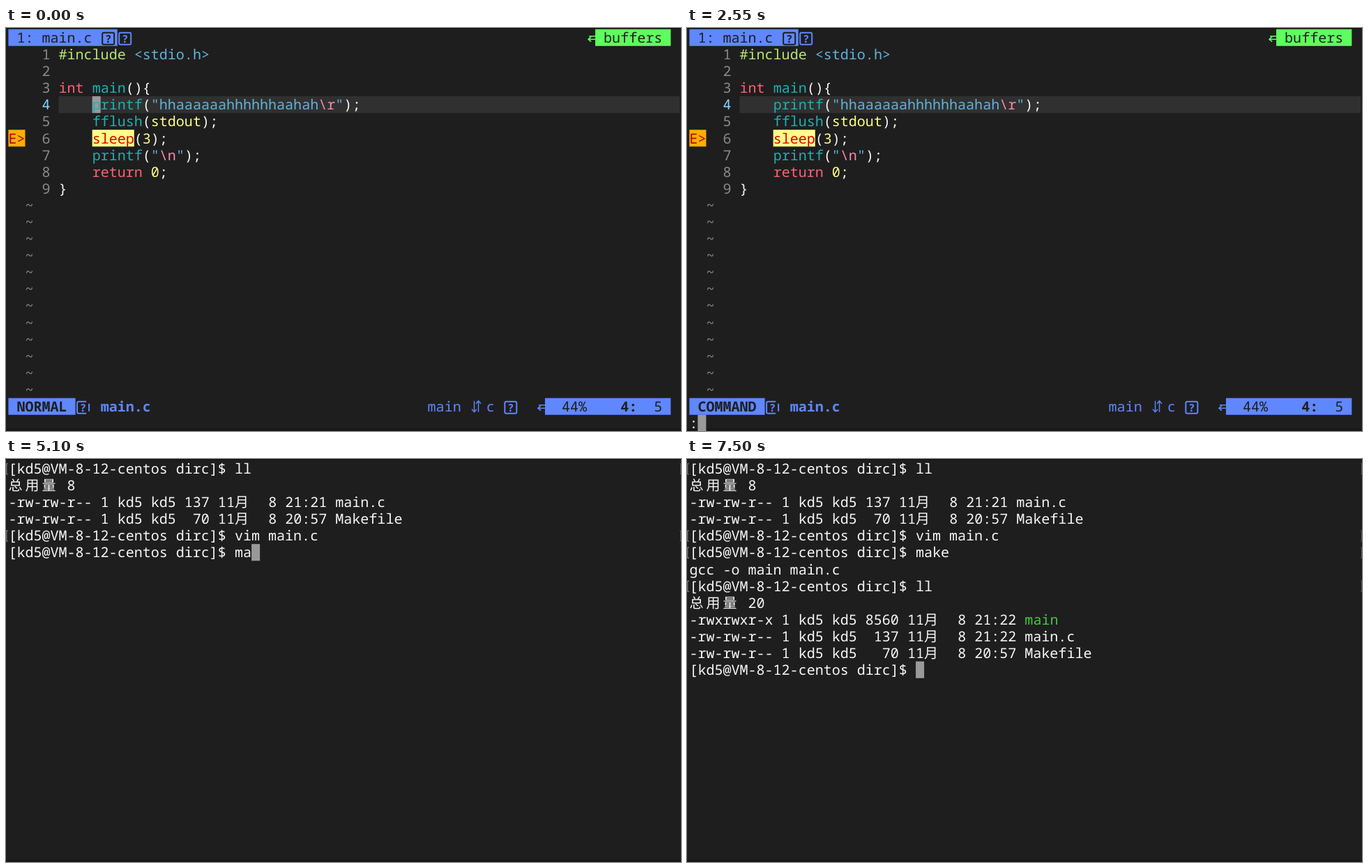
An HTML page that plays this animation: 968 by 579 pixels, repeating every 8000 ms.

```html
<!DOCTYPE html>
<html lang="en">
<head>
<meta charset="utf-8">
<title>Terminal session</title>
<style>
  html, body { margin: 0; width: 100%; height: 100%; overflow: hidden; background: #1e1e1e; }
  svg { display: block; width: 968px; height: 579px; }
  text {
    font: 20.04px "Noto Sans Mono", "DejaVu Sans Mono", monospace;
    white-space: pre;
    text-rendering: geometricPrecision;
    font-variant-ligatures: none;
  }
  .wide { font-family: "Noto Sans CJK SC", "Noto Sans CJK", sans-serif; }
  .bold { font-weight: 700; }
</style>
</head>
<body>
<svg id="stage" viewBox="0 0 968 579"></svg>
<script>
const LOOP = 8000, CELL_W = 12.024, CELL_H = 24.09, LEFT = 3.4, TOP = 1.7;
const BG = '#1e1e1e', BLUE = '#5f87ff', GREEN = '#5fff5f', WHITE = '#f7f7f7', GRAY = '#8a8a8a';
const LIME = '#b8e673', SKY = '#5fb3dc', TEAL = '#1fb0b0', RED = '#ff6078', PINK = '#ff87af', YELLOW = '#ffff87';
const stage = document.getElementById('stage');
const timed = [];
let layer = stage;

const colX = col => LEFT + col * CELL_W;
const rowY = row => TOP + row * CELL_H;

function add(tag, attrs, content = '') {
  const el = document.createElementNS('http://www.w3.org/2000/svg', tag);
  for (const [key, value] of Object.entries(attrs)) el.setAttribute(key, value);
  el.textContent = content;
  return layer.appendChild(el);
}

const block = (col, row, cells, fill) =>
  add('rect', { x: colX(col), y: rowY(row), width: cells * CELL_W, height: CELL_H, fill });

const line = (d, stroke, width = 1.6) =>
  add('path', { d, stroke, fill: 'none', 'stroke-width': width });

// Writes text on the grid; Chinese characters take two cells each.
function write(col, row, text, fill = WHITE, cls = '') {
  for (const run of text.match(/[\u4e00-\u9fff]|[^\u4e00-\u9fff]+/g)) {
    const wide = run >= '\u4e00';
    if (run.trim()) {
      add('text', { x: colX(col), y: rowY(row) + 19.3, fill, class: wide ? 'wide' : cls }, run);
    }
    col += wide ? 2 : run.length;
  }
  return col;
}

function spans(col, row, ...parts) {
  for (const [text, fill] of parts) col = write(col, row, text, fill);
}

// Adds a group that is visible only in the given [from, to) ranges.
function during(ranges, draw) {
  const parent = layer;
  layer = add('g', {});
  timed.push({ el: layer, ranges });
  draw();
  layer = parent;
}

function missingGlyph(col, row, color, cut = false) {
  const x = colX(col) + 2.5, y = rowY(row) + 5;
  if (cut) line(`M${x + 13} ${y}H${x + 2}Q${x} ${y} ${x} ${y + 2}V${y + 15}Q${x} ${y + 17} ${x + 2} ${y + 17}H${x + 13}M${x + 17} ${y + 3}V${y + 14}`, color, 2);
  else add('rect', { x, y, width: 17, height: 17, rx: 2, fill: 'none', stroke: color, 'stroke-width': 2 });
  add('text', { x: x + 8.5, y: y + 14, fill: color, class: 'bold', 'text-anchor': 'middle', style: 'font-size:15px' }, '?');
}

function arrow(col, row, color) {
  const x = colX(col), y = rowY(row) + 10;
  line(`M${x} ${y}H${x - 9}M${x} ${y + 4.5}H${x - 10}M${x - 6} ${y + 1}L${x - 10} ${y + 4.5}L${x - 6} ${y + 8}`, color);
}

function mode(name) {
  const end = name.length + 2;
  block(0, 22, end, BLUE);
  write(1, 22, name, BG, 'bold');
  missingGlyph(end, 22, BLUE, true);
  write(end + 3, 22, 'main.c', BLUE, 'bold');
}

function editor() {
  block(0, 0, 13, BLUE);
  write(1, 0, '1: main.c', BG);
  missingGlyph(11, 0, BG);
  missingGlyph(13, 0, BLUE);
  arrow(70, 0, GREEN);
  block(70, 0, 9, GREEN);
  write(71, 0, 'buffers', BG);

  for (let n = 1; n <= 9; n++) write(4, n, String(n), n === 4 ? '#87d7ff' : GRAY);
  for (let row = 10; row <= 21; row++) write(2, row, '~', GRAY);

  spans(6, 1, ['#include ', LIME], ['<stdio.h>', SKY]);
  spans(6, 3, ['int ', RED], ['main', TEAL], ['(){', WHITE]);
  spans(10, 4, ['printf', TEAL], ['(', WHITE], ['"hhaaaaaahhhhhhaahah', SKY], ['\\r', PINK], ['"', SKY], [');', WHITE]);
  spans(10, 5, ['fflush', TEAL], ['(', WHITE], ['stdout', YELLOW], [');', WHITE]);
  block(0, 6, 2, '#ffaf00');
  write(0, 6, 'E>', '#b00000');
  block(10, 6, 5, YELLOW);
  spans(10, 6, ['sleep', '#d70000'], ['(', WHITE], ['3', YELLOW], [');', WHITE]);
  spans(10, 7, ['printf', TEAL], ['(', WHITE], ['"', SKY], ['\\n', PINK], ['"', SKY], [');', WHITE]);
  spans(10, 8, ['return ', RED], ['0', YELLOW], [';', WHITE]);
  write(6, 9, '}');

  write(50, 22, 'main', BLUE);
  const y = rowY(22);
  line(`M671.5 ${y + 4}V${y + 20}M668 ${y + 16}L671.5 ${y + 20}L675 ${y + 16}M677.5 ${y + 20}V${y + 4}M674 ${y + 8}L677.5 ${y + 4}L681 ${y + 8}`, BLUE, 1.4);
  write(57, 22, 'c', BLUE);
  missingGlyph(59, 22, BLUE);
  arrow(64, 22, BLUE);
  block(64, 22, 15, BLUE);
  write(66, 22, '44%', BG);
  write(73, 22, '4:', BG, 'bold');
  write(77, 22, '5', BG);
}

const PROMPT = '[kd5@VM-8-12-centos dirc]$ ';
const prompt = (row, command = '') => write(0, row, PROMPT + command);

function mark(row) {
  const y = rowY(row);
  line(`M3 ${y + 5}H.8V${y + 20}H3`, '#858585', 1.1);
  line(`M966 ${y + 5}H967.5V${y + 20}H966`, '#555', 1);
}

// Top and bottom window edges
add('rect', { width: 968, height: 1.2, fill: '#101010' });
add('rect', { y: 575.5, width: 968, height: 3.5, fill: '#19161a' });

during([[0, 3600]], () => add('rect', {
  x: colX(6), y: rowY(4), width: 966 - colX(6), height: CELL_H, fill: '#303030'
}));

const cursor = block(0, 0, 1, '#999');

const commandTimes = [[750, 1650], [2100, 3600]];
during([[0, 3600]], editor);
during([[0, 750], [1650, 2100]], () => mode('NORMAL'));
during(commandTimes, () => mode('COMMAND'));
during(commandTimes, () => write(0, 23, ':'));
during([[1050, 1650], [3000, 3600]], () => write(1, 23, 'w'));
during([[3150, 3600]], () => write(2, 23, 'q'));
during([[1650, 2100]], () => write(0, 23, '"main.c" 9L, 137C written'));

during([[3600, LOOP]], () => {
  mark(0);
  prompt(0, 'll');
  write(0, 1, '总用量 8');
  write(0, 2, '-rw-rw-r-- 1 kd5 kd5 137 11月  8 21:21 main.c');
  write(0, 3, '-rw-rw-r-- 1 kd5 kd5  70 11月  8 20:57 Makefile');
  mark(4);
  prompt(4, 'vim main.c');
  prompt(5);
});
during([[5100, LOOP]], () => write(27, 5, 'ma'));
during([[5250, LOOP]], () => write(29, 5, 'k'));
during([[5400, LOOP]], () => write(30, 5, 'e'));
during([[5550, LOOP]], () => {
  mark(5);
  write(0, 6, 'gcc -o main main.c');
});
during([[5700, LOOP]], () => prompt(7));
during([[7050, LOOP]], () => write(27, 7, 'l'));
during([[7200, LOOP]], () => write(28, 7, 'l'));
during([[7350, LOOP]], () => {
  mark(7);
  write(0, 8, '总用量 20');
  spans(0, 9, ['-rwxrwxr-x 1 kd5 kd5 8560 11月  8 21:22 ', WHITE], ['main', '#3fcb3a']);
  write(0, 10, '-rw-rw-r-- 1 kd5 kd5  137 11月  8 21:22 main.c');
  write(0, 11, '-rw-rw-r-- 1 kd5 kd5   70 11月  8 20:57 Makefile');
  prompt(12);
});

// Cursor stops: [time, column, row]
const stops = [
  [0, 10, 4], [750, 1, 23], [1050, 2, 23], [1650, 25, 23], [1800, 10, 4],
  [2100, 1, 23], [3000, 2, 23], [3150, 3, 23], [3600, 27, 5],
  [5100, 29, 5], [5250, 30, 5], [5400, 31, 5], [5550, 0, 7], [5700, 27, 7],
  [7050, 28, 7], [7200, 29, 7], [7350, 27, 12]
];

function frame() {
  const time = performance.now() % LOOP;
  for (const { el, ranges } of timed) {
    const on = ranges.some(([from, to]) => time >= from && time < to);
    el.setAttribute('visibility', on ? 'visible' : 'hidden');
  }
  const [, col, row] = stops.findLast(stop => stop[0] <= time);
  cursor.setAttribute('x', colX(col));
  cursor.setAttribute('y', rowY(row));
  requestAnimationFrame(frame);
}
frame();
</script>
</body>
</html>
```
